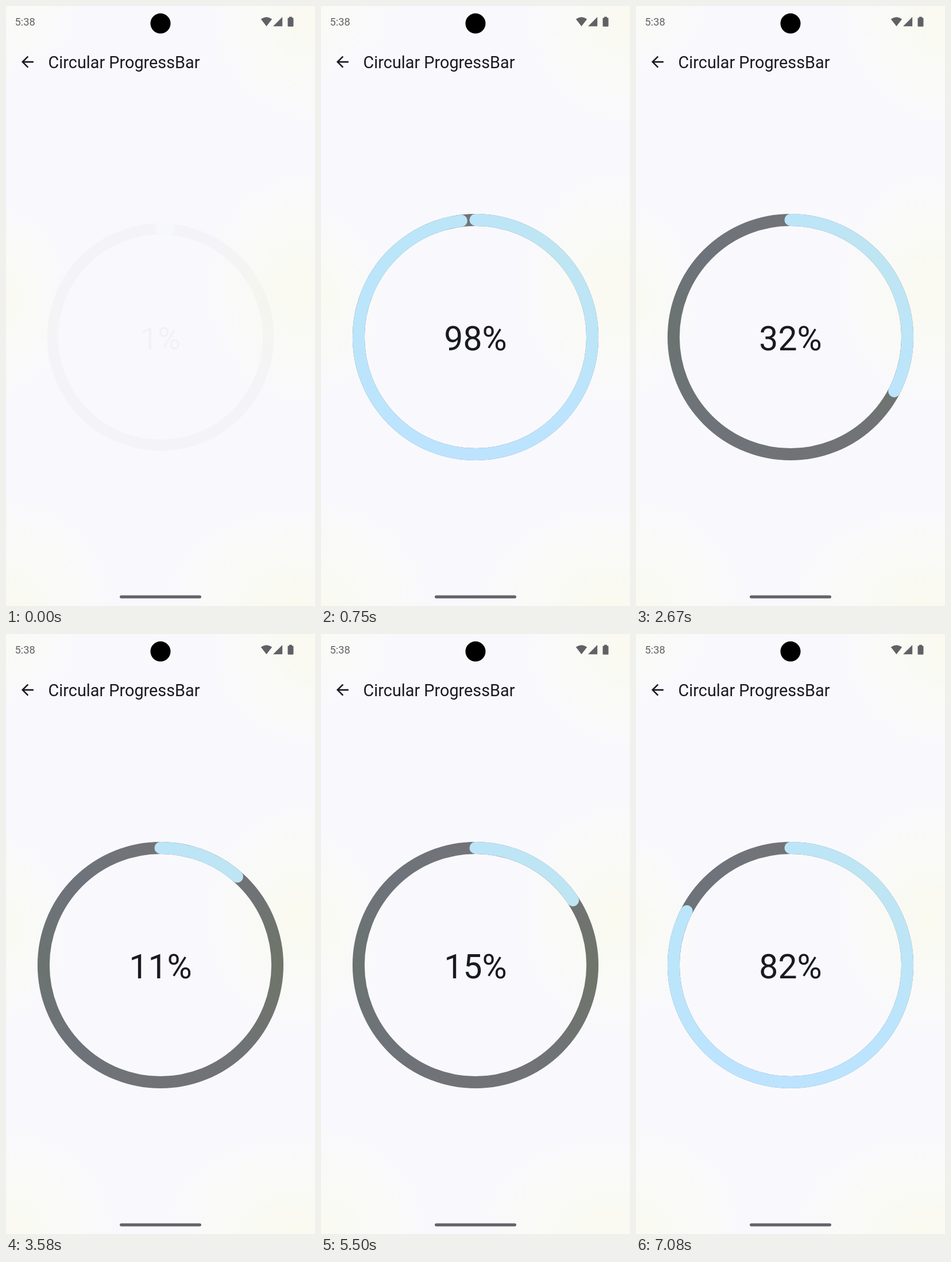
Recreate the animation shown at these times as an HTML page with a canvas. Size 538 px wide and 1042 px high, loop 7120 ms.

```html
<!DOCTYPE html>
<html lang="en">
<head>
<meta charset="utf-8">
<title>Circular ProgressBar</title>
<style>
  html, body { margin: 0; width: 100%; height: 100%; overflow: hidden; }
  body {
    position: relative;
    background:
      radial-gradient(circle at 538px 20px, #fafaf0 0, #fafaf000 190px),
      radial-gradient(ellipse 170px 210px at 510px 490px, #fafaf0 0, #fafaf000 100%),
      radial-gradient(ellipse 110px 170px at 0 510px, #fafaf2 0, #fafaf200 100%),
      radial-gradient(ellipse 200px 190px at 0 1042px, #fafaf1 0, #fafaf100 100%),
      radial-gradient(ellipse 240px 180px at 500px 1042px, #fafaf0 0, #fafaf000 100%),
      radial-gradient(circle at 0 0, #fafaf5 0, #fafaf500 130px),
      #f9f9fd;
  }
  canvas, svg { position: absolute; left: 0; top: 0; width: 538px; height: 1042px; }
  text { font-family: Roboto, "Liberation Sans", sans-serif; fill: #191a22; }
</style>
</head>
<body>
<canvas id="ring" width="538" height="1042"></canvas>
<svg viewBox="0 0 538 1042">
  <text x="15.5" y="34" font-size="18.3" style="fill:#636468">5:38</text>
  <circle cx="269" cy="30.3" r="17.5"/>
  <g fill="#606165">
    <path d="M443.8 22.8Q453.5 15.6 463.2 22.8L453.5 35.2Z"/>
    <path d="M481.2 19V35.2H465Z"/>
    <path d="M493 18.8h5v1.7h1.2q1.3 0 1.3 1.3v12.7q0 1.3-1.3 1.3h-7.4q-1.3 0-1.3-1.3v-12.7q0-1.3 1.3-1.3h1.2z"/>
  </g>
  <path fill="#191a22" transform="translate(21.7 81.4) scale(1.309)"
        d="M20 11H7.83l5.59-5.59L12 4l-8 8 8 8 1.41-1.41L7.83 13H20z"/>
  <text x="73.6" y="107.7" font-size="28.8">Circular ProgressBar</text>
  <g id="label"><text id="percent" x="269" y="598" font-size="58.9" text-anchor="middle"></text></g>
  <rect x="198" y="1023.4" width="142" height="5.4" rx="2.7" fill="#646369"/>
</svg>
<script>
const LOOP = 7120, STEPS = 171;
const CX = 269, CY = 575, R = 203.6, WIDTH = 21;

// Progress eases to a new target every second.
const TARGETS = [0, 100, 48.9, 31.85, 9.43, 19.5, 15, 82.6, 82.6];
const TWEEN = 1000, LEAD = 72;
const FADE = 220, FADE_LEAD = 23;

const ctx = document.getElementById('ring').getContext('2d');
const label = document.getElementById('label');
const percent = document.getElementById('percent');

// cubic-bezier(0.4, 0, 0.2, 1)
function ease(x) {
  if (x <= 0) return 0;
  if (x >= 1) return 1;
  let lo = 0, hi = 1, s = 0.5;
  for (let i = 0; i < 24; i++) {
    s = (lo + hi) / 2;
    const bx = 1.2 * s * (1 - s) ** 2 + 0.6 * s * s * (1 - s) + s ** 3;
    if (bx < x) lo = s; else hi = s;
  }
  return s * s * (3 - 2 * s);
}

function sweep(colors) {
  const g = ctx.createConicGradient(-Math.PI / 2, CX, CY);
  colors.forEach((c, i) => g.addColorStop(i / (colors.length - 1), c));
  return g;
}

const trackPaint = sweep(['#727377', '#707277', '#6f7569', '#707374', '#717276',
                          '#6e737a', '#6b7370', '#6e737b', '#727377']);
const barPaint = sweep(['#bce5f8', '#bee5f2', '#bce5f8', '#bce4fe', '#bde3ff',
                        '#bce4fe', '#bbe5fb', '#bbe5f9', '#bce5f8']);

function arc(paint, part, cap) {
  ctx.beginPath();
  ctx.arc(CX, CY, R, -Math.PI / 2, -Math.PI / 2 + part * 2 * Math.PI);
  ctx.strokeStyle = paint;
  ctx.lineWidth = WIDTH;
  ctx.lineCap = cap;
  ctx.stroke();
}

function progressAt(t) {
  const u = (t + LEAD) / TWEEN;
  const i = Math.min(Math.floor(u), TARGETS.length - 2);
  return TARGETS[i] + (TARGETS[i + 1] - TARGETS[i]) * ease(u - i);
}

function draw(t) {
  const value = progressAt(t);
  const alpha = ease((t + FADE_LEAD) / FADE);
  const scale = 0.92 + 0.08 * alpha;

  ctx.clearRect(0, 0, 538, 1042);
  ctx.save();
  ctx.translate(CX, CY);
  ctx.scale(scale, scale);
  ctx.translate(-CX, -CY);
  arc(trackPaint, 1, 'butt');
  arc(barPaint, value / 100, 'round');
  ctx.restore();
  ctx.canvas.style.opacity = alpha;

  label.setAttribute('opacity', alpha);
  label.setAttribute('transform',
    `translate(${CX} ${CY}) scale(${scale}) translate(${-CX} ${-CY})`);
  percent.textContent = Math.floor(value) + '%';
}

const start = performance.now();
function tick() {
  const t = (performance.now() - start) % LOOP;
  const step = LOOP / STEPS;
  draw(Math.floor(t / step) * step);
  requestAnimationFrame(tick);
}
tick();
</script>
</body>
</html>
```
